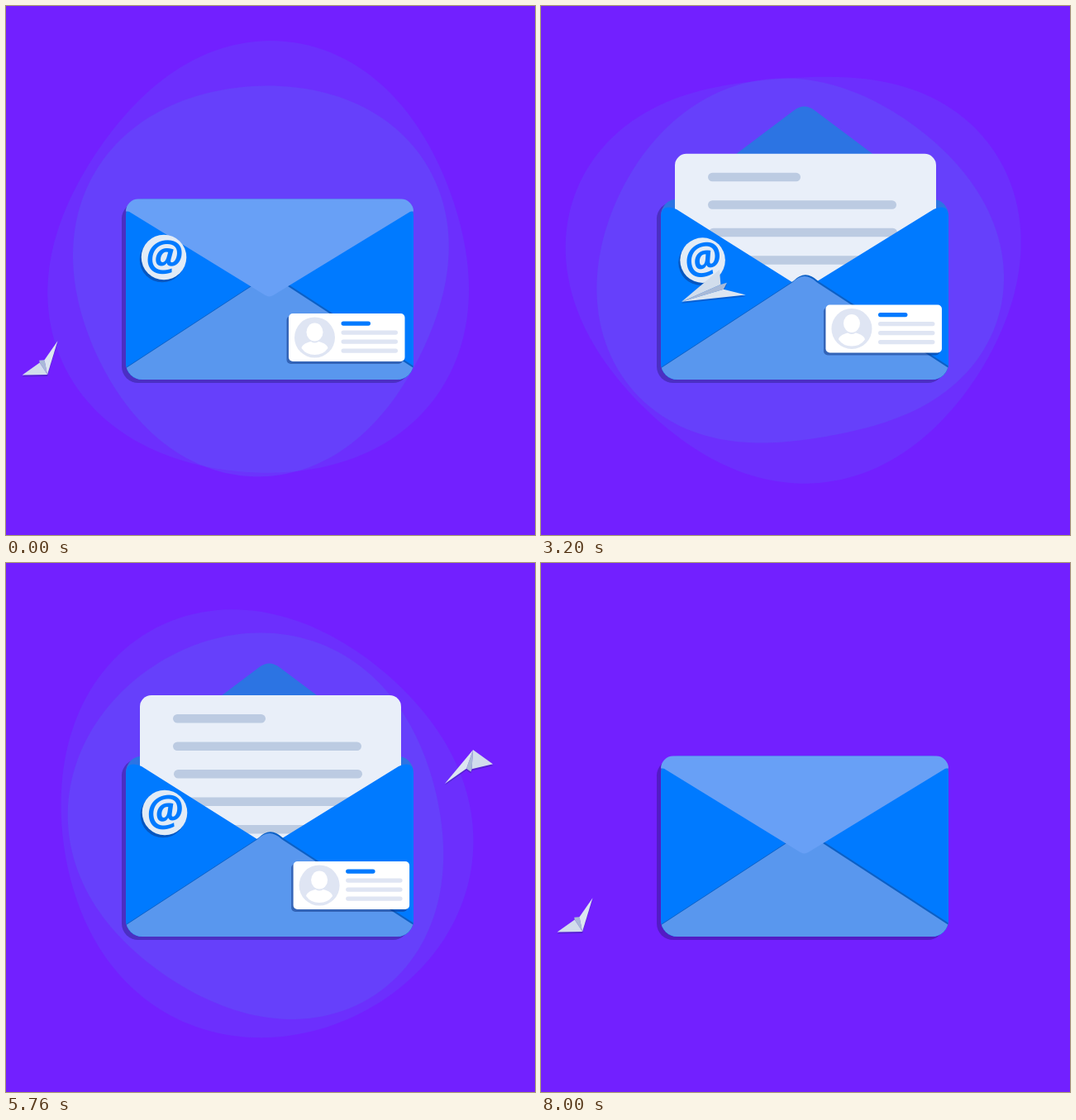
These frames come from a looping animation (640x640 px, 8.04 s). An HTML page with a canvas:

```html
<!DOCTYPE html>
<html>
<head>
<meta charset="utf-8">
<style>
html, body { margin: 0; height: 100%; overflow: hidden; background: #7220ff; }
canvas { display: block; }
</style>
</head>
<body>
<canvas id="stage" width="640" height="640"></canvas>
<script>
const g = document.getElementById('stage').getContext('2d');
const LOOP = 8040, DRIFT = 8000, CYCLE = 4000;
const { sin, cos, PI } = Math, RAD = PI / 180;

const clamp = x => Math.max(0, Math.min(1, x));
const smooth = x => (x = clamp(x)) * x * (3 - 2 * x);

// Smooth closed path through keys [time, x, y, angle]; the angle gains `turn` per period.
function path(period, keys, turn = 0) {
  const n = keys.length;
  const key = (i, lap = Math.floor(i / n)) =>
    keys[(i + n) % n].map((v, c) => v + lap * (c === 0 ? period : c === 3 ? turn : 0));
  return t => {
    let i = n - 1;
    while (keys[i][0] > t) i--;
    const [a, b, c, d] = [key(i - 1), key(i), key(i + 1), key(i + 2)];
    const [h0, h, h1] = [b[0] - a[0], c[0] - b[0], d[0] - c[0]];
    const u = (t - b[0]) / h, v = 1 - u;
    return b.slice(1).map((_, j) => {
      j++;
      const rate = (c[j] - b[j]) / h;
      const start = ((b[j] - a[j]) / h0 * h + rate * h0) / (h0 + h);
      const end = (rate * h1 + (d[j] - c[j]) / h1 * h) / (h + h1);
      return v * v * (1 + 2 * u) * b[j] + u * u * (3 - 2 * u) * c[j] + h * u * v * (v * start - u * end);
    });
  };
}

const badgeAt = path(DRIFT, [[0, 191, 304], [1080, 203, 308.5], [2560, 197.5, 306.5],
  [3840, 194, 308.5], [5760, 192, 302], [7440, 194.5, 297]]);
const cardAt = path(DRIFT, [[0, 342, 372], [1080, 342.3, 365.7], [2560, 349.3, 361.3],
  [3840, 339.3, 362], [5760, 347.6, 361], [7440, 344.4, 367.5]]);
// Nose of the plane, with its heading in degrees
const noseAt = path(CYCLE, [[0, 50, 446, 66], [1080, 400, 324, -27], [1760, 565, 226, -80],
  [2560, 444, 254, -195], [3440, 93, 395, -211], [3840, 45, 440, -259]], -360);

function fill(shape, color, dx = 0, dy = 0) {
  g.save();
  g.translate(dx, dy);
  g.fillStyle = color;
  g.fill(shape);
  g.restore();
}

function box(x, y, w, h, r) {
  const p = new Path2D();
  p.roundRect(x, y, w, h, r);
  return p;
}

function oval(x, y, rx, ry = rx) {
  const p = new Path2D();
  p.ellipse(x, y, rx, ry, 0, 0, 2 * PI);
  return p;
}

const polygon = points => new Path2D('M' + points.join('L') + 'Z');

// A circle bent by a two-lobed and a three-lobed wave
function blob(x, y, radius, amp2, phase2, amp3, phase3, color) {
  const points = [];
  for (let a = 0; a < 2 * PI; a += PI / 90) {
    const r = radius + amp2 * cos(2 * a - phase2) + amp3 * cos(3 * a - phase3);
    points.push([x + r * cos(a), y + r * sin(a)]);
  }
  fill(polygon(points), color);
}

function blobs(t) {
  const w = 2 * PI * t / DRIFT, c = cos(w), s = sin(w);
  blob(309, 317 - 3 * c, 257 + 4 * s, 10 - 5 * c, 215 * RAD + w, 11 + 4 * s, 108 * RAD + w, 'rgba(70,150,235,.13)');
  blob(308, 319 + 5 * c, 231 + 2 * s, 10 - 4 * c, 207 * RAD + w, 9 + 2 * s, 268 * RAD + w, 'rgba(70,150,235,.17)');
}

const body = box(145, 233.5, 348, 218.5, 20);
const lid = box(145, 233.5, 348, 15, [20, 20, 0, 0]);
const sides = new Path2D('M145 452V256Q145 238 164 246L318 343L475 246Q493 238 493 256V452Z');
const pocket = new Path2D('M145 438.300L304 334.500Q318.500 319.500 334 334.500L493 438V452H145Z');

function flap(h) {
  const hinge = 247, k = h > 0 ? 0.93 : 0.97;
  const p = new Path2D();
  p.moveTo(146, hinge);
  p.lineTo(146 + 172.5 * k, hinge - h * k);
  p.quadraticCurveTo(318.5, hinge - h, 492 - 173.5 * k, hinge - h * k);
  p.lineTo(492, hinge);
  p.closePath();
  return p;
}

function paper(p) {
  const up = smooth((p - 440) / 640) - smooth((p - 3045) / 530);
  const top = 250 - 90 * up;
  fill(box(162, top, 316, 190, 14), '#e9eff9');
  for (let i = 0; i < 5; i++) {
    const w = (i ? 228 : 112) * clamp((p - 655 - 200 * i) / 200);
    if (w > 0) fill(box(202 + (i > 1), top + 23 + 33.5 * i, Math.max(w, 10.5), 10.5, 5.25), '#bccbe2');
  }
}

function envelope(p) {
  const open = smooth((p - 60) / 480) - smooth((p - 3380) / 460);
  const h = -106 + 236 * open;
  fill(body, 'rgba(35,20,110,.4)', -5, 4);
  fill(body, '#2c74e3');
  if (h > 0) fill(flap(h), '#2c74e3');
  paper(p);
  g.save();
  g.clip(body);
  fill(sides, '#007aff');
  fill(pocket, '#0b60c6', 1.2, -1.7);
  fill(pocket, '#5997ee');
  g.restore();
  if (h <= 0) {
    fill(lid, '#68a0f6');
    fill(flap(h), '#68a0f6');
  }
}

function badge([x, y], tilt) {
  const disc = oval(0, 0, 27.3);
  g.save();
  g.translate(x, y);
  fill(disc, 'rgba(10,50,130,.5)', -2, 3);
  fill(disc, '#e2ebf6');
  g.rotate(tilt);
  g.font = 'italic 700 51px "Open Sans", "Noto Sans", sans-serif';
  g.textAlign = 'center';
  g.fillStyle = '#007aff';
  g.fillText('@', 0, 15.5);
  g.restore();
}

function card([x, y]) {
  const sheet = box(0, 0, 140.5, 58, 5), face = oval(31.5, 29, 24.5);
  g.save();
  g.translate(x, y);
  fill(sheet, 'rgba(15,50,130,.5)', -2.5, 3);
  fill(sheet, '#fff');
  fill(face, '#dfe5f3');
  fill(oval(31.5, 22.5, 10, 11), '#fff');
  fill(new Path2D('M15.500 42C16 37 24 34.500 27 34Q31.500 37 36 34C39 34.500 47 37 47.500 42Q42 50 31.500 50Q21 50 15.500 42Z'), '#fff');
  for (let i = 0; i < 4; i++)
    fill(box(63.5, 9.5 + 11 * i, i ? 68.5 : 35.5, 5.2, 2.6), i ? '#dfe5f3' : '#007aff');
  g.restore();
}

// The dart looks long in flight and short and wide in its two turns; `roll` skews the wings.
function plane(p) {
  const [x, y, heading] = noseAt(p);
  const w = 2 * PI * p / CYCLE, flight = Math.min(1, 1.3 * sin(w) ** 2);
  const length = 22 + 44 * flight, span = 28 - 8 * flight;
  const roll = 12 * cos(2 * w - 110 * RAD) - 6;
  const c = cos(heading * RAD), s = sin(heading * RAD);
  const at = (u, v) => [x + u * c - v * s, y + u * s + v * c];
  const nose = [x, y], tail = at(-length * 0.9, 2);
  const leftFold = at(-length * 0.8, -4), rightFold = at(-length * 0.78, 2.5);
  const keel = polygon([nose, leftFold, tail, rightFold]);
  const left = polygon([nose, at(roll - length, -span), leftFold]);
  const right = polygon([nose, rightFold, at(-roll - length, span)]);
  for (const part of [left, keel, right]) fill(part, 'rgba(25,35,110,.3)', 0, 2);
  fill(keel, '#a9bad8');
  fill(left, '#dce5f1');
  fill(right, '#d2ddec');
}

function draw(now) {
  const t = now % LOOP, p = t % CYCLE;
  const dressed = t < DRIFT;
  g.fillStyle = '#7220ff';
  g.fillRect(0, 0, 640, 640);
  if (dressed) blobs(t);
  envelope(p);
  if (dressed) {
    badge(badgeAt(t), (6 * cos(2 * PI * t / DRIFT) - 5) * RAD);
    card(cardAt(t));
  }
  plane(p);
}

function tick() {
  draw(performance.now());
  requestAnimationFrame(tick);
}
tick();
</script>
</body>
</html>
```
